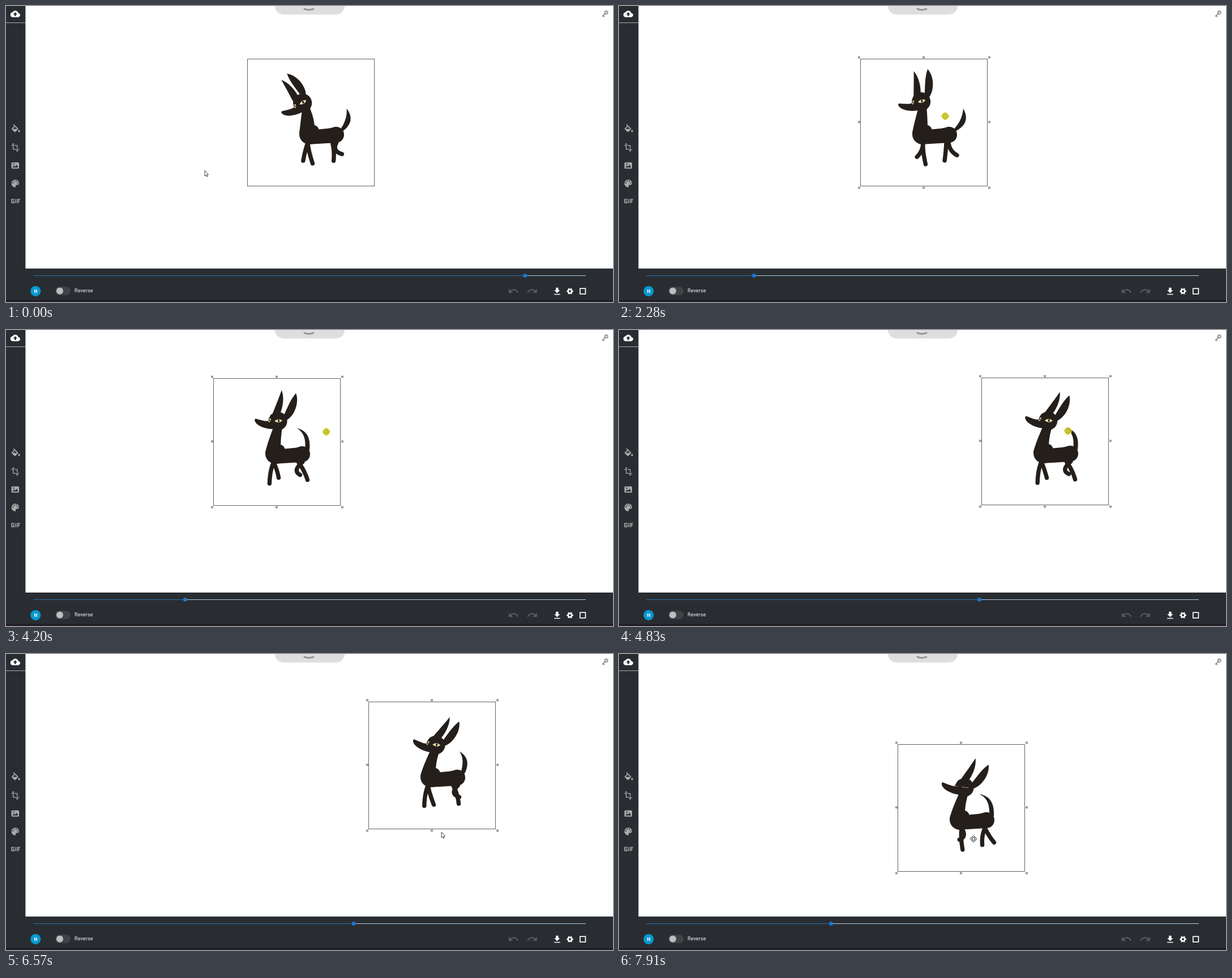
An HTML page for the animation above (7990 ms loop, 1072 by 522 pixels).

```html
<!DOCTYPE html>
<html lang="en">
<head>
<meta charset="utf-8">
<title>Walk cycle editor</title>
<style>
  html, body { margin: 0; width: 100%; height: 100%; overflow: hidden; background: #fff; }
  svg { display: block; width: 100%; height: 100%; }
  text { font-family: Roboto, Arial, sans-serif; letter-spacing: .1px; }
  .ink { fill: #251f1b; }
  .leg { fill: none; stroke: #251f1b; stroke-width: 7.4; stroke-linecap: round; }
  .tool { fill: #a9abad; }
  .line { fill: none; stroke: #a9abad; stroke-width: 1.7; }
  .box { fill: #fff; stroke: #626262; }
  .hole { fill: #292d32; }
</style>
</head>
<body>
<svg viewBox="0 0 1072 522">
  <rect width="1072" height="522" fill="#fff"/>

  <!-- artboard -->
  <g id="board">
    <rect class="box" x=".5" y=".5" width="224" height="224"/>
    <g id="handles"></g>
    <path id="tail" class="ink"/>
    <path id="rear0" class="leg"/><path id="rear1" class="leg"/>
    <path id="front0" class="leg"/><path id="front1" class="leg"/>
    <g class="ink">
      <circle cx="110" cy="133" r="18"/>
      <circle cx="117.500" cy="126" r="9"/>
      <circle cx="157" cy="134" r="14"/>
      <path d="M108 151L158 148V120Q142 124 126 124.500L108 128Z"/>
      <path id="neck"/>
    </g>
    <g id="head">
      <path id="ear0" class="ink" d="M11-54C15-41 11-23 4-11L-9-12C-3-25 4-38 11-54Z"/>
      <path id="ear1" class="ink" d="M27-52C35-36 28-12 15-3L9-10C14-22 17-38 27-52Z"/>
      <g id="face">
        <circle class="ink" r="16.500"/>
        <path class="ink" d="M-16-4L-12-12L-6 0L-8 14C-18 14-30 11-37 5C-42 0-42-5-38-4C-30-2-24 0-18 0Z"/>
        <g id="eyes" fill="#eee3ae">
          <path d="M-6 0Q1-6.500 8-1Q2 5-6 0Z"/>
          <path d="M-17-1Q-15-6-12-4Q-13 2-16 2Z"/>
          <ellipse class="ink" cx="1.500" cy="-.8" rx="1.600" ry="2.500"/>
          <ellipse class="ink" cx="-14.600" cy="-1.400" rx="1" ry="2"/>
        </g>
      </g>
    </g>
  </g>

  <!-- chrome -->
  <path d="M475 0H598A15 15 0 0 1 583 15H490A15 15 0 0 1 475 0Z" fill="#dedede"/>
  <path d="M527 5.200L533 6.800H537L543 5.200" fill="none" stroke="#979797" stroke-width="3" stroke-linecap="round"/>
  <g transform="translate(1058 13.500) rotate(-45)" fill="none" stroke="#9a9a9a" stroke-width="2.200">
    <circle cx="3" r="2.500"/>
    <path d="M0 0H-7M-5 0V3"/>
  </g>
  <path class="hole" d="M0 0H34.400V463H1072V522H0Z"/>
  <rect y="518.500" width="1072" height="3.500" fill="#241c25"/>
  <path d="M0 29.500H34.400" stroke="#aaacae"/>

  <path transform="translate(7.700 5.300) scale(.72)" fill="#fff" d="M19.350 10.040C18.670 6.590 15.640 4 12 4 9.110 4 6.600 5.640 5.350 8.040 2.340 8.360 0 10.910 0 14c0 3.310 2.690 6 6 6h13c2.760 0 5-2.240 5-5 0-2.640-2.050-4.780-4.650-4.960zM14 13v4h-4v-4H7l5-5 5 5h-3z"/>
  <path transform="translate(7.500 208.500) scale(.82)" class="tool" d="M16.560 8.940L7.620 0 6.210 1.410l2.380 2.380-5.150 5.150c-.59.59-.59 1.540 0 2.120l5.500 5.500c.29.29.68.44 1.060.44s.77-.15 1.060-.44l5.500-5.500c.59-.58.59-1.530 0-2.120zM5.210 10L10 5.210 14.790 10zM19 11.500s-2 2.170-2 3.500c0 1.100.9 2 2 2s2-.9 2-2c0-1.330-2-3.500-2-3.500z"/>
  <path transform="translate(7.900 241) scale(.7)" class="tool" d="M22 18v-2H8V4h2L7 1 4 4h2v2H2v2h4v8c0 1.100.9 2 2 2h8v2h-2l3 3 3-3h-2v-2zM10 8h6v6h2V8c0-1.100-.9-2-2-2h-6z"/>
  <g transform="translate(16.300 281.300)">
    <rect class="tool" x="-6.700" y="-5.500" width="13.400" height="11" rx="1.500"/>
    <path class="hole" d="M-5 3.500L-2 0L0 2L2.500-1.500L5 3.500Z"/>
    <circle class="hole" cx="-2.500" cy="-2.500" r="1.200"/>
  </g>
  <g transform="translate(16.300 313)">
    <path class="tool" d="M0-6.700A6.700 6.700 0 0 0 0 6.700Q1.800 6 .8 4.500Q.2 2.600 2 2.600H3.500Q6.700 2 6.700-1Q6-6 0-6.700Z"/>
    <g class="hole"><circle cx="-4" cy="-1" r="1.100"/><circle cx="-1.800" cy="-4" r="1.100"/><circle cx="1.900" cy="-4" r="1.100"/><circle cx="4.200" cy="-1" r="1.100"/></g>
  </g>
  <path transform="translate(17 344)" class="line" d="M-2-3H-6.800V3H-2.800V0H-4.500M.5-3.800V3.800M3.800 3.800V-3H8M3.800.3H7.300"/>

  <path d="M48 475.500H1024" stroke="#b4cfe6" stroke-width="1.200"/>
  <path id="played" stroke="#2b71a9" stroke-width="1.200"/>
  <circle id="knob" cy="475.500" r="3.500" fill="#1976d2"/>
  <circle cx="52.300" cy="502.800" r="9.100" fill="#0898d0"/>
  <path d="M50.800 500V505.700M54 500V505.700" stroke="#fff" stroke-width="1.700"/>
  <rect x="87" y="495" width="27" height="15" rx="7.500" fill="#3f4347"/>
  <circle cx="95" cy="502.500" r="6" fill="#bebebe"/>
  <text x="121" y="505.300" font-size="9" fill="#f2f2f2">Reverse</text>

  <defs><path id="undo" d="M12.500 8c-2.650 0-5.050.99-6.900 2.600L2 7v9h9l-3.620-3.620c1.390-1.160 3.160-1.880 5.120-1.880 3.540 0 6.550 2.310 7.600 5.500l2.370-.78C21.080 11.030 17.150 8 12.500 8z"/></defs>
  <use href="#undo" transform="translate(886 492.500) scale(.85)" fill="#575a5e"/>
  <use href="#undo" transform="translate(939.500 492.500) scale(-.85 .85)" fill="#575a5e"/>
  <path transform="translate(964.500 494.500) scale(.74)" fill="#fff" d="M19 9h-4V3H9v6H5l7 7 7-7zM5 18v2h14v-2z"/>
  <g transform="translate(996 503)" fill="none" stroke="#fff" stroke-width="2.500">
    <circle r="3.200"/>
    <path id="teeth"/>
  </g>
  <rect x="1013.800" y="498.200" width="9.600" height="9.600" fill="none" stroke="#fff" stroke-width="1.700"/>

  <!-- pointer -->
  <g id="pointer">
    <path id="arrow" d="M0 0V10L2.300 8L3.700 11L5.200 10.300L3.900 7.300H6.500Z" fill="#fff" stroke="#333" stroke-width=".9"/>
    <circle id="halo" r="6.700" fill="#eeea45" opacity=".88"/>
    <path id="cross" fill="none" stroke-width=".9"/>
  </g>
</svg>

<script>
const LOOP = 7990, STEPS = 101, TAU = Math.PI * 2;
const $ = id => document.getElementById(id);
const set = (id, name, value) => $(id).setAttribute(name, value);
const show = (id, on) => set(id, 'visibility', on ? 'visible' : 'hidden');
const mix = (a, b, k) => a + (b - a) * k;
const clamp = (v, lo, hi) => Math.min(hi, Math.max(lo, v));
const wave = (t, peak) => Math.cos(TAU * (t - peak));
const bump = (t, peak, power) => ((1 + wave(t, peak)) / 2) ** power;

// Each move: first step, last step, destination.
const boardMoves = [[31, 37, 180, 86], [51, 59, 640, 84], [86, 93, 492, 159]];
const pointerMoves = [
  [9, 15, 573, 201], [28, 31, 579, 188], [31, 36, 341, 181], [51, 57.3, 793, 178],
  [70, 75, 769, 314], [83, 86, 774, 251], [86, 92, 626, 326]
];

function glide(moves, x, y, step) {
  for (const [from, to, toX, toY] of moves) {
    const k = 1 - (1 - clamp((step - from) / (to - from), 0, 1)) ** 1.8;
    x = mix(x, toX, k);
    y = mix(y, toY, k);
  }
  return [x, y];
}

// Playback in turns: steady, with a brief stall after step 53.
function playback(step) {
  const stall = clamp(step - 53, 0, 8);
  return (.89 + step * .045 - stall * .004 - Math.max(0, step - 61) * .0006) % 1;
}

function frontLeg(u) {
  const lift = bump(u, .97, 2.5);
  const plant = Math.tanh(3 * (wave(u, .22) - .3));
  return {
    hip: 109 + 4 * wave(2 * u, 0),
    foot: [107 - 8.5 * plant, 186 - 18 * lift],
    bend: 16 * lift * lift - 3
  };
}

function rearLeg(u) {
  const a = TAU * (u - .07);
  return {
    hip: 154 - 4 * Math.sin(TAU * u),
    foot: [160 - 11 * Math.cos(a + .6 * Math.sin(a) ** 2), 180 - 12 * bump(u, .7, 1.5)],
    bend: 3 - 20 * bump(u, .78, 2)
  };
}

function drawLeg(id, { hip, foot, bend }) {
  set(id, 'd', `M${hip} 148Q${(hip + foot[0]) / 2 + bend} 163 ${foot}`);
}

function drawAnimal(p) {
  const stride = (p * 6 % 1) / 2;
  for (const n of [0, 1]) {
    drawLeg('front' + n, frontLeg(stride + n / 2));
    drawLeg('rear' + n, rearLeg(stride + n / 2));
  }

  const d = 1.1 * Math.tanh(2.2 * bump(p * 3, .52, 3));
  set('tail', 'd', `M170 127C${171 + 15 * d} ${105 + 12 * d} ${164 + 26 * d} ${91 + 13 * d} ${144 + 36 * d} 88` +
    `C${158 + 21 * d} ${94 + 11 * d} ${163 + 10 * d} ${106 + 9 * d} ${162 + 2 * d} 126Z`);

  const sway = wave(p, .465);
  const x = 109.3 + 13 * sway, y = 75.5 + 2.5 * (sway - .1) ** 2;
  const tilt = 22.3 * (sway - .37);
  const c = Math.cos(tilt * TAU / 360), s = Math.sin(tilt * TAU / 360);
  const onHead = (a, b) => `${x + a * c - b * s} ${y + a * s + b * c}`;
  set('neck', 'd', `M92 132Q93 122 ${onHead(-9, 14)}L${onHead(-7, 6)}L${onHead(9, 8)}L${onHead(7, 16)}Q119 108 119 122L122 134Z`);
  set('head', 'transform', `translate(${x} ${y})`);
  set('face', 'transform', `rotate(${tilt})`);
  set('ear0', 'transform', `rotate(${42 * wave(p, .473) - 18})`);
  set('ear1', 'transform', `rotate(${45 * wave(p, .453) - 14})`);

  const lid = clamp(Math.abs(p - .34) / .05, .2, 1);
  set('eyes', 'transform', `scale(1 ${lid})`);
}

function setup() {
  for (const x of [-2, 112, 228]) for (const y of [-2.5, 111.5, 227.5]) {
    if (x === 112 && y === 111.5) continue;
    const r = document.createElementNS('http://www.w3.org/2000/svg', 'rect');
    const box = { class: 'box', x: x - 1.2, y: y - 1.2, width: 2.4, height: 2.4 };
    for (const name in box) r.setAttribute(name, box[name]);
    $('handles').append(r);
  }
  const ring = (count, part) => Array.from({ length: count }, (_, i) => {
    const c = Math.cos(i * TAU / count), s = Math.sin(i * TAU / count);
    return part((x, y) => `${x * c - y * s} ${x * s + y * c}`);
  }).join('');
  set('teeth', 'd', ring(6, at => `M${at(4, 0)}L${at(5.7, 0)}`));
  set('cross', 'd', ring(4, at =>
    `M${at(1, 1)}L${at(3.4, 1)}L${at(3.4, 2.7)}L${at(6.2, 0)}L${at(3.4, -2.7)}L${at(3.4, -1)}L${at(1, -1)}`));
}

function draw(ms) {
  const step = Math.floor(ms / (LOOP / STEPS) + .25);

  const p = playback(step);
  const knob = 48 + p * 976;
  set('knob', 'cx', knob);
  set('played', 'd', `M48 475.5H${knob}`);
  drawAnimal(p);

  const [bx, by] = glide(boardMoves, 426, 93, step);
  set('board', 'transform', `translate(${Math.round(bx)} ${Math.round(by)})`);
  show('handles', step >= 15);

  const [x, y] = glide(pointerMoves, 351, 290, step);
  const over = x > bx && x < bx + 225 && y > by && y < by + 225;
  const held = (step >= 15 && step < 68) || (step >= 86 && step < 95);
  set('pointer', 'transform', `translate(${x} ${y})`);
  show('arrow', !over && !held);
  show('cross', over || held);
  show('halo', held);
  set('cross', 'stroke', held ? '#8d8a12' : '#333');
}

setup();
const start = performance.now();
function tick() {
  draw((performance.now() - start) % LOOP);
  requestAnimationFrame(tick);
}
tick();
</script>
</body>
</html>
```
